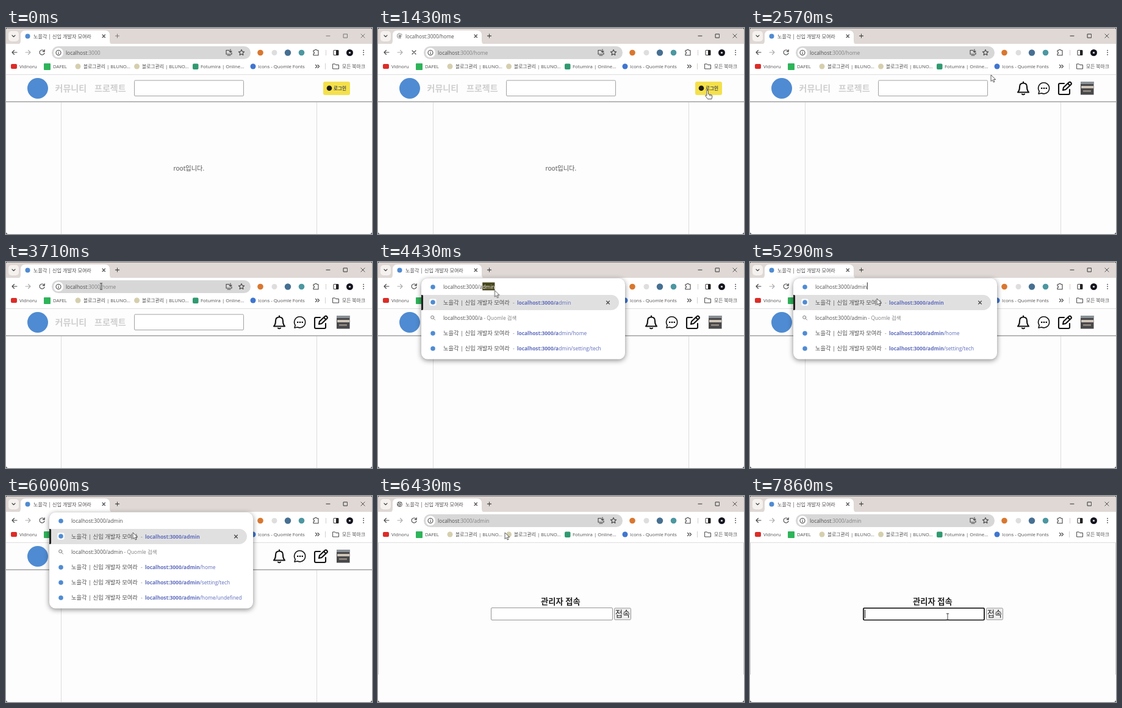
Animation of 600x338 px, one loop 8000 ms. Source, as an HTML page:

```html
<!DOCTYPE html>
<html lang="ko">
<head>
<meta charset="utf-8">
<title>Admin page walkthrough</title>
<style>
html, body { margin: 0; width: 100%; height: 100%; overflow: hidden; background: #333; }
svg { display: block; width: 100%; height: 100%; border-radius: 4px; }
text { font: 8.4px "Open Sans", "Noto Sans CJK KR", "Noto Sans CJK", sans-serif; fill: #505050; white-space: pre; }
.line { fill: none; stroke: #444; stroke-width: 1.1; stroke-linecap: round; stroke-linejoin: round; }
.soft { stroke: #777; stroke-width: 1; }
.tab { font-size: 8.1px; }
.marks text { font-size: 7.8px; }
.menu { font-size: 14px; font-weight: 700; fill: #cecece; }
.title { font-size: 9.3px; }
.dim { fill: #808080; }
.link { fill: #5f6dbd; }
.bold { font-weight: 700; }
.form { font-size: 13.3px; fill: #222; }
.panel { fill: #fff; filter: drop-shadow(0 2.5px 4.5px #0007); }
#pointer { animation: glide 8s infinite -20ms; }
#spinner { transform-origin: 35.5px 13px; animation: spin 1s linear infinite; }
@keyframes spin { to { transform: rotate(360deg); } }
@keyframes glide {
  0%, 1.75% { transform: translate(592px, 166px); animation-timing-function: steps(5); }
  10.75%, 24.875% { transform: translate(540px, 103px); animation-timing-function: steps(8); }
  39.25% { transform: translate(250px, 51px); animation-timing-function: steps(3); }
  44.625%, 50% { transform: translate(156px, 40px); animation-timing-function: steps(2); }
  53.625% { transform: translate(183px, 40px); animation-timing-function: steps(3); }
  59%, 91.125% { transform: translate(208px, 60px); animation-timing-function: steps(2); }
  94.625% { transform: translate(385px, 191px); animation-timing-function: steps(1); }
  96.5%, 100% { transform: translate(324px, 198px); }
}
</style>
</head>
<body>
<svg viewBox="0 0 600 338" preserveAspectRatio="none">
  <rect width="600" height="338" fill="#fdfdfd"/>

  <!-- tab strip -->
  <rect width="600" height="27" fill="#dfd8d5"/>
  <path d="M0 .5h600" stroke="#8d8886"/>
  <rect x="4" y="5" width="17" height="17" rx="5" fill="#f5f1ef"/>
  <path class="line" d="M10 12l2.5 2.5L15 12"/>
  <path d="M18 27q6 0 6-6v-9q0-8 8-8h130q8 0 8 8v9q0 6 6 6z" fill="#fff"/>
  <circle cx="35.5" cy="13.5" r="4" fill="#4f8bd2" data-at="0 1140 1570 6290 6720 8000"/>
  <g data-at="1140 1570">
    <circle cx="36" cy="13.5" r="2.4" fill="#999"/>
    <path id="spinner" class="line soft" d="M35.5 9a4 4 0 1 1-4 4"/>
  </g>
  <g data-at="6290 6720">
    <circle cx="35.5" cy="13.5" r="4.5" fill="#777"/>
    <path d="M32 12l3 1.5-1 3M36 9.5l-.5 2 2.5 1.5 1.5-1M37 16.5V15l2-.5" fill="none" stroke="#fff"/>
  </g>
  <text class="tab site" x="45" y="16.5" data-at="0 1140 1570 8000"></text>
  <text class="tab" x="45" y="16.5" data-at="1140 1570">localhost:3000/home</text>
  <path class="line" d="M158 11l4.5 4.5m0-4.5L158 15.5"/>
  <path class="line soft" d="M179.5 13h6m-3-3v6M525 13h6M553.5 10h6v6h-6zM582 10l6 6m0-6l-6 6"/>
  <path class="line" style="stroke-width:1" data-at="720 8000" d="M179.5 13h6m-3-3v6"/>
  <path class="line" style="stroke-width:.7" data-at="720 8000" d="M525 13h6M553.5 10h6v6h-6zM582 10l6 6m0-6l-6 6"/>

  <!-- toolbar -->
  <rect y="26" width="600" height="50" fill="#fff"/>
  <path d="M0 76.5h600" stroke="#dedede"/>
  <path class="line" d="M18 40h-8m3.5-3.5L10 40l3.5 3.5"/>
  <path class="line" style="stroke:#aaa" d="M32 40h8m-3.5-3.5L40 40l-3.5 3.5"/>
  <path class="line" d="M62.3 37.6A4 4 0 1 0 63 41M63.2 35.6v3h-3" data-at="0 1140 1570 8000"/>
  <path class="line" d="M56 37l6 6m0-6l-6 6" data-at="1140 1570"/>
  <rect x="75" y="30" width="326" height="21" rx="10.5" fill="#d8d7d7"/>
  <rect x="75.5" y="30" width="325" height="21" rx="10.5" fill="#fff" stroke="#4a4822" stroke-width="1.5" data-at="4000 4430"/>
  <circle cx="86" cy="40.5" r="8" fill="#fff"/>
  <circle class="line" cx="86" cy="40.5" r="4"/>
  <path class="line" d="M86 40.3v2.2m0-4v.1"/>
  <g id="address"></g>
  <path class="line" d="M366 36.5h-5V43h9v-2.5M363 45h5M368 35v5m-2-2l2 2 2-2"/>
  <path class="line" d="M386 35.6l1.4 3 3.2.4-2.4 2.2.7 3.2-2.9-1.6-2.9 1.6.7-3.2-2.4-2.2 3.2-.4z"/>
  <circle cx="417" cy="40.5" r="4.8" fill="#d9772f"/>
  <circle cx="440" cy="40.5" r="4.5" fill="#dedede"/>
  <circle cx="462" cy="40.5" r="5.2" fill="#466f92"/>
  <circle cx="484.5" cy="40.5" r="4.8" fill="#4b97a0"/>
  <path class="line" d="M504 36.8h2.3a1.6 1.6 0 0 1 3.2 0h2.5v8h-8v-2.6a1.5 1.5 0 0 0 0-3z"/>
  <path d="M524.5 36v9M523.5 58v10" stroke="#d5cfcc"/>
  <rect class="line" x="537" y="36.5" width="8" height="8" rx="1"/>
  <path d="M541 36.5h4v8h-4z" fill="#222"/>
  <circle cx="563.5" cy="40.5" r="5.5" fill="#14141f"/>
  <circle cx="563.5" cy="40.5" r="1.6" fill="#ddd"/>
  <path d="M585.3 36h1.6v1.6h-1.6zm0 3.5h1.6v1.6h-1.6zm0 3.5h1.6v1.6h-1.6z" fill="#444"/>
  <g class="marks">
    <rect x="8" y="59" width="10" height="8" rx="2" fill="#dd2c28"/><text x="22" y="66">Vidnoru</text>
    <rect x="62" y="58" width="11" height="11" rx="1" fill="#2fb45a"/><text x="77" y="66">DAFEL</text>
    <circle cx="118" cy="63" r="4.5" fill="#d5cfae"/><text x="127" y="66">블로그관리 | BLUNO...</text>
    <circle cx="214.5" cy="63" r="4.5" fill="#d5cfae"/><text x="223" y="66">블로그관리 | BLUNO...</text>
    <rect x="306" y="58.5" width="9.5" height="9.5" rx="2" fill="#2f9a70"/><text x="319" y="66">Fotumira | Online...</text>
    <circle cx="405" cy="63" r="4.5" fill="#3f76d0"/><text x="413" y="66">Icons - Quomle Fonts</text>
    <path class="line" d="M507.5 60.5L510 63l-2.5 2.5m3.5-5l2.5 2.5-2.5 2.5"/>
    <path class="line" style="stroke-width:1" d="M536 59h3.5l1 1.5h5V67H536z"/><text x="551" y="66">모든 북마크</text>
  </g>

  <!-- site pages -->
  <g data-at="0 6290">
    <circle cx="52" cy="99" r="17" fill="#4f8bd2"/>
    <text class="menu" x="80.5" y="103.5">커뮤니티</text>
    <text class="menu" x="145" y="103.5">프로젝트</text>
    <rect x="210.5" y="86" width="179" height="25.5" rx="1.5" fill="#fff" stroke="#a2a2a2"/>
    <path d="M90.5 122v216M509.5 122v216" stroke="#dcdcdc"/>
    <path d="M0 121h600" stroke="#707070"/>
  </g>
  <g data-at="0 1720">
    <rect x="520" y="88" width="44" height="22" rx="3" fill="#f4e04c"/>
    <circle cx="530" cy="98.8" r="4.3" fill="#1c1a10"/>
    <text class="bold" x="537" y="101.8" style="font-size:7.6px">로그인</text>
    <text x="274.5" y="234" style="font-size:10.2px">root입니다.</text>
  </g>
  <g data-at="1720 6290">
    <g class="line" style="stroke:#111;stroke-width:2.1">
      <path d="M439 105.5q3-3 3-9 0-6 6-6t6 6q0 6 3 9zM448 90v-1.5M446 108.5q2 1.5 4 0"/>
      <path style="stroke-width:1.6" d="M473 108l1.2-4.2A9 9 0 1 1 478 107z"/>
      <path d="M515 91h-7q-2 0-2 2v14q0 2 2 2h14q2 0 2-2v-6"/>
      <path d="M513 102l1-4.5 9-8.5q1.5-1 3 .5t.5 3l-9 8.5zM521 91l3.500 3.500"/>
    </g>
    <path d="M477 97.7h2.4v2.4H477zm3.8 0h2.4v2.4h-2.4zm3.8 0h2.4v2.4h-2.4z" fill="#111"/>
    <rect x="542" y="88" width="21.5" height="21.5" fill="#48474a"/>
    <path d="M542 88h21.5v4H542z" fill="#8a9297"/>
    <path d="M543 95h20v4h-20z" fill="#cfc6b8"/>
    <path d="M546 102h13v3h-13z" fill="#89837c"/>
  </g>
  <g data-at="6290 8000">
    <path d="M.5 77v216M599.5 77v216" stroke="#cfcfcf"/>
    <text class="form bold" x="267" y="178">관리자 접속</text>
    <rect x="185.5" y="183.5" width="199" height="20" rx="1.5" fill="#fff" stroke="#959595"/>
    <rect x="387.5" y="184" width="27" height="19" rx="1.5" fill="#efefef" stroke="#959595"/>
    <text class="form" x="388.7" y="198.3">접속</text>
    <g data-at="7860 8000">
      <rect x="186" y="184" width="198" height="19.5" rx="1.5" fill="#fff" stroke="#111" stroke-width="1.7"/>
      <path d="M188.5 186.5v14" stroke="#111"/>
    </g>
  </g>

  <!-- address suggestions -->
  <g data-at="4430 6290">
    <rect class="panel" x="71" y="27" width="334" height="132.5" rx="10" data-at="4430 5430"/>
    <rect class="panel" x="71" y="27" width="334" height="157.5" rx="10" data-at="5430 6290"/>
    <path d="M71 54h311.500a12.500 12.500 0 0 1 0 25H71z" fill="#e1e0e0"/>
    <path d="M71 54h1.5q1.500 0 1.500 2v21q0 2-1.500 2H71z" fill="#222"/>
    <rect x="84.5" y="60.5" width="11" height="11" rx="2" fill="#fff"/>
    <path class="line" d="M374.5 64l5 5m0-5l-5 5"/>
    <circle class="line soft" cx="89.2" cy="90.8" r="2.5"/>
    <path class="line soft" d="M91.2 92.8l2.3 2.3"/>
    <g id="suggestions"></g>
    <path d="M192.3 33.5V45" stroke="#222" data-at="5290 6000"/>
  </g>

  <g id="pointer">
    <path data-at="720 2140" d="M-1 1q0-1.5 1.3-1.5T1.5 1v4.5l5 1.2q1.5.5 1.3 2.3L7 13.5H.5L-3.5 8q.5-1.8 2.5 0zM3.5 6.5v2M5.7 7v2" fill="#fff" stroke="#333" stroke-width=".8"/>
    <path data-at="140 720 2140 3430 4430 7720" d="M0 0v10.5l2.5-2.3 1.7 3.8 1.8-.8-1.7-3.7h3.4z" fill="#fff" stroke="#333" stroke-width=".8"/>
    <path data-at="3430 4430 7720 8000" class="line" style="stroke-width:1" d="M-1.8-5H1.8M0-5V5M-1.8 5H1.8"/>
  </g>
</svg>
<script>
const LOOP = 8000;
const SITE = '노을각 | 신입 개발자 모여라';
const HOST = 'localhost:3000/';
const byId = id => document.getElementById(id);
const text = (x, y, content, attrs = '') => `<text x="${x}" y="${y}" ${attrs}>${content}</text>`;
const span = (kind, content) => `<tspan class="${kind}">${content}</tspan>`;

// Text whose last part is selected; the highlight is sized once laid out.
const selectable = (x, y, plain, picked) =>
  `<rect y="${y - 10}" height="13" fill="#48461d"/>` +
  text(x, y, plain + `<tspan fill="#fff">${picked}</tspan>`, `class="selectable" data-plain="${plain.length}"`);

const url = path => span('', 'localhost') + span('dim', ':3000' + path);
byId('address').innerHTML =
  text(98, 43.5, url(''), 'data-at="0 1140"') +
  text(98, 43.5, url('/home'), 'data-at="1140 4290"') +
  `<g data-at="4290 4430">${selectable(98, 43.5, HOST, 'home')}</g>` +
  text(98, 43.5, url('/admin'), 'data-at="6290 8000"');

const suggestion = (y, typed, rest) =>
  text(107, y, SITE, 'class="title"') + text(221, y, '-', 'class="dim"') +
  text(228, y, span('bold link', HOST + typed) + span('link', rest));

const word = 'admin';
const keyTimes = [4430, 4720, 5000, 5140, 5290, 6290];
const pages = ['', '/home', '/setting/tech'];
const rowY = [69.5, 120, 145];
const states = [...word].map((_, i) => {
  const typed = word.slice(0, i + 1), rest = word.slice(i + 1);
  return `<g data-at="${keyTimes[i]} ${keyTimes[i + 1]}">` +
    selectable(107, 43.5, HOST + typed, rest) +
    text(107, 94.5, HOST + typed + span('dim', ' - Quomle 검색')) +
    pages.map((page, r) => suggestion(rowY[r], typed, rest + page)).join('') + '</g>';
});
const icon = y => `<circle cx="90" cy="${y}" r="3.8" fill="#4f8bd2"/>`;
byId('suggestions').innerHTML = [41, 66, 117, 142].map(icon).join('') + states.join('') +
  `<g data-at="5570 6290">${icon(167)}${suggestion(170, word, '/home/undefined')}</g>`;

document.querySelector('.site').textContent = SITE;

document.querySelectorAll('.selectable').forEach(el => {
  const start = el.getSubStringLength(0, +el.dataset.plain);
  const mark = el.previousElementSibling;
  mark.setAttribute('x', +el.getAttribute('x') + start);
  mark.setAttribute('width', el.getComputedTextLength() - start);
});

// data-at lists alternating show and hide times in ms.
const rules = [...document.querySelectorAll('[data-at]')].map((el, i) => {
  const stops = el.dataset.at.split(' ').map((ms, k) => `${ms / LOOP * 100}%{opacity:${1 - k % 2}}`);
  el.style.animation = `at${i} ${LOOP}ms step-end -20ms infinite`;
  return `@keyframes at${i}{0%{opacity:0}${stops.join('')}}`;
});
document.head.appendChild(document.createElement('style')).textContent = rules.join('\n');
</script>
</body>
</html>
```
